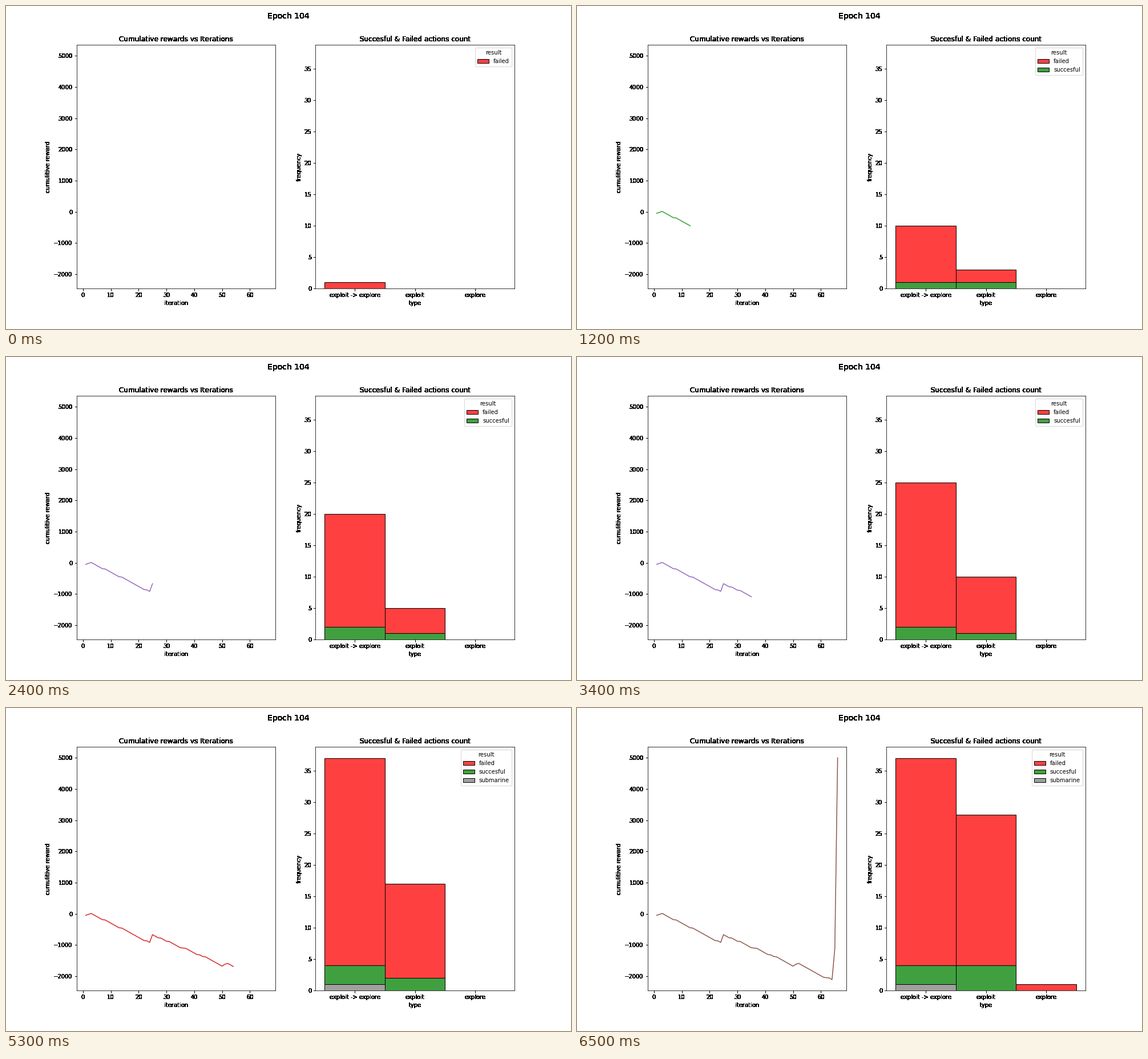
A matplotlib script that plays this animation: 990 px wide and 566 px high, repeating every 6.6 s.

```python
import numpy as np
import matplotlib.pyplot as plt
from matplotlib.animation import FuncAnimation
from matplotlib.patches import Patch

W, H, DPI = 990, 566, 72
STEPS = 66
TYPES = ["exploit -> explore", "exploit", "explore"]
RESULTS = ["failed", "succesful", "submarine"]
FACES = [(1, 0, 0, .75), (0, .5, 0, .75), (.5, .5, .5, .75)]

plt.rcParams.update({"font.family": "DejaVu Sans", "font.size": 10})

its = np.arange(1, STEPS + 1)

# A failed action costs 50, a repeated one 10; a few actions pay off.
GAINS = {2: 30, 3: 30, 25: 250, 51: 60, 52: 30, 65: 1000, 66: 6110}
REPEATS = (8, 14, 23, 28, 31, 36, 37, 42, 44, 62, 63)
SUBMARINE = 37
reward = np.cumsum([GAINS.get(n, -10 if n in REPEATS else -50) for n in its])
result = np.where(its == SUBMARINE, 2, np.isin(its, list(GAINS)))

# Exploits pile up at an uneven pace; the rest are explorations.
exploits = np.round(np.interp(its, (0, 13, 25, 35, 43, 54, 56, 66),
                              (0, 3, 5, 10, 11, 17, 18, 28)))
is_exploit = np.diff(exploits, prepend=0) > 0
kind = np.where(is_exploit, 1, np.where(its > 54, 2, 0))


def harden(img, dpi):
    """Turn every touched pixel solid black."""
    out = np.zeros_like(img)
    out[..., 3] = img[..., 3] > 0.04
    return out, 0, 0


def padded(low, high):
    pad = .05 * (high - low)
    return low - pad, high + pad


def style(ax, title, xlabel, ylabel, xlim, ylim, yticks):
    ax.set(xlabel=xlabel, ylabel=ylabel, xlim=xlim, ylim=ylim, yticks=yticks)
    ax.set_title(title, fontsize=12)
    for part in (ax.title, ax.xaxis, ax.yaxis):
        part.set_agg_filter(harden)


fig, (left, right) = plt.subplots(1, 2, figsize=(W / DPI, H / DPI), dpi=DPI,
                                  facecolor="white")
fig.subplots_adjust(left=.125, right=.9, top=.88, bottom=.125, wspace=.2)
fig.suptitle("Epoch 104", fontsize=14).set_agg_filter(harden)

style(left, "Cumulative rewards vs Iterations", "iteration",
      "cumulitive reward", padded(1, STEPS),
      padded(reward.min(), reward.max()), range(-2000, 5001, 1000))
left.set_xticks(range(0, 61, 10))

tallest = np.bincount(kind).max()
style(right, "Succesful & Failed actions count", "type", "frequency",
      padded(-.5, 2.5), (0, 1.05 * tallest), range(0, 36, 5))
right.set_xticks(range(3), TYPES)

line, = left.plot([], [], lw=1.5)
bars = [right.bar(range(3), [0] * 3, width=1, color=face, edgecolor="black",
                  linewidth=1) for face in FACES]
handles = [Patch(facecolor=face, edgecolor="black", linewidth=1, label=name)
           for face, name in zip(FACES, RESULTS)]


def update(i):
    n = i + 1
    line.set_data(its[:n], reward[:n])
    line.set_color(f"C{i % 10}")

    base = np.zeros(3)
    for r in (2, 1, 0):
        counts = np.bincount(kind[:n][result[:n] == r], minlength=3)
        for bar, y, count in zip(bars[r], base, counts):
            bar.set(y=y, height=count, visible=count > 0)
        base += counts

    seen = result[:n].max() + 1
    right.legend(handles=handles[:seen], title="result", loc="upper right")
    return []


anim = FuncAnimation(fig, update, frames=STEPS, init_func=lambda: update(0),
                     interval=100, repeat=True, repeat_delay=0)
plt.show()
```
